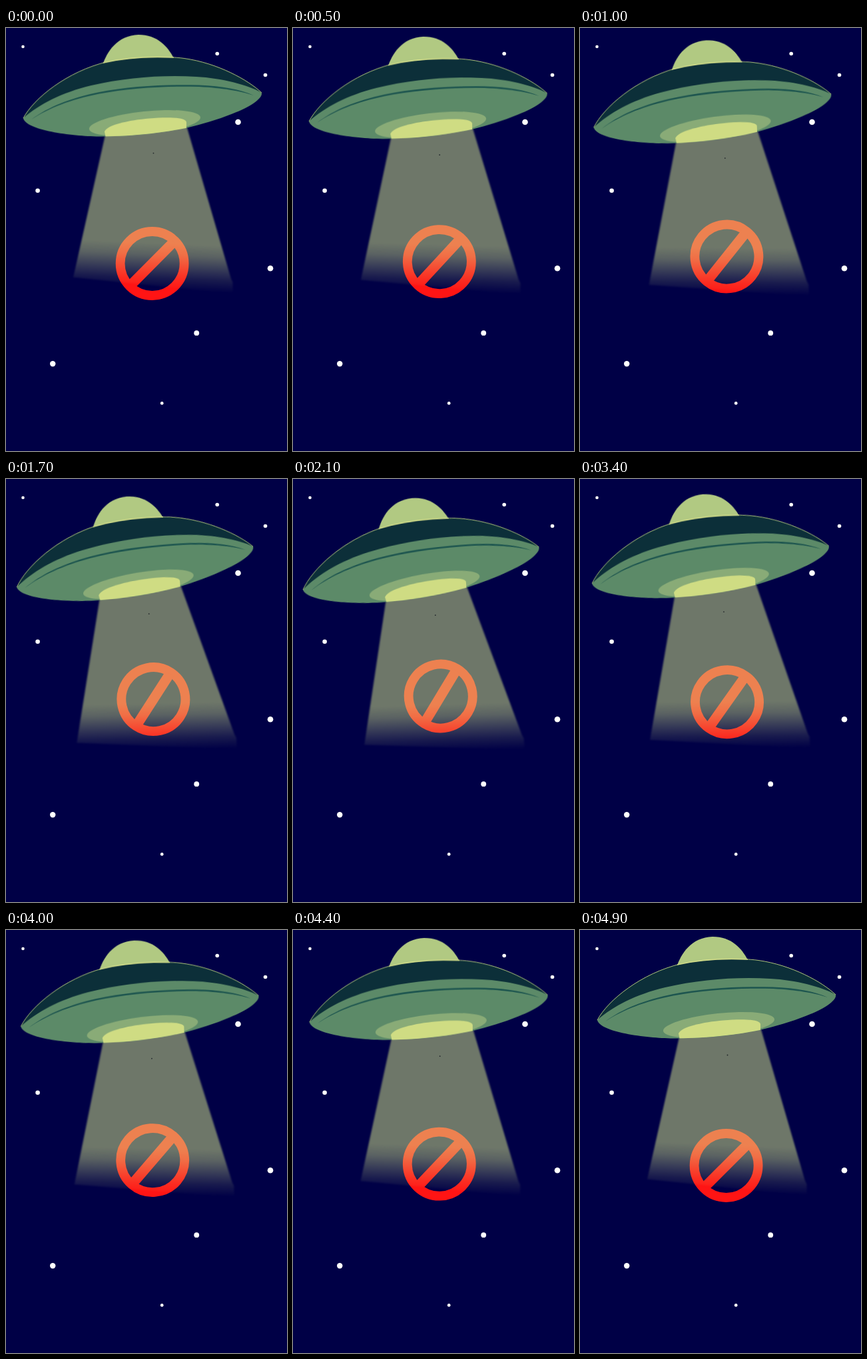
An HTML page for the animation above (5 s loop, 422 px wide and 634 px high).

```html
<!DOCTYPE html>
<html lang="en">
<head>
<meta charset="utf-8">
<title>Saucer</title>
<style>
  html, body { margin: 0; width: 100%; height: 100%; overflow: hidden; background: #000046; }
  svg { display: block; width: 100%; height: 100%; }
</style>
</head>
<body>
<svg viewBox="0 0 422 634" xmlns="http://www.w3.org/2000/svg">
  <defs>
    <linearGradient id="fade" gradientUnits="userSpaceOnUse" x1="220.5" y1="392" x2="223.500" y2="322">
      <stop offset="0" stop-color="#dcee8c" stop-opacity="0"/>
      <stop offset=".25" stop-color="#dcee8c" stop-opacity=".11"/>
      <stop offset=".5" stop-color="#dcee8c" stop-opacity=".26"/>
      <stop offset=".75" stop-color="#dcee8c" stop-opacity=".41"/>
      <stop offset="1" stop-color="#dcee8c" stop-opacity=".5"/>
    </linearGradient>
    <filter id="soft"><feGaussianBlur stdDeviation=".9"/></filter>
    <filter id="smooth"><feGaussianBlur stdDeviation=".4"/></filter>
    <clipPath id="hullClip">
      <path id="hull" d="M26 135 C42 105 92 65 152 50.500 C190 42.500 240 41.500 268 45.500 C318 52.500 364 78 384 97
        C386 105 368 118 340 128.500 C317 137.500 294 144.500 270 150 C228 158.500 185 162.500 140 162.500
        C98 162 30 153 26 135 Z"/>
    </clipPath>
  </defs>

  <rect width="422" height="634" fill="#000046"/>
  <g id="stars" fill="#fff"></g>

  <g id="sign" fill="none" stroke="#ff1414" stroke-width="13.800">
    <circle r="48"/>
    <path d="M-45 0H45" stroke-width="15"/>
  </g>

  <g id="ship">
    <path d="M150 156 L271 146 L338 376 L340.500 381 V398.500 L101 373.500 Z" fill="url(#fade)" filter="url(#soft)"/>
    <circle cx="221.500" cy="187.500" r=".9" fill="#23282c"/>

    <g filter="url(#smooth)">
      <path d="M145 56 C151 36 167 11 199 10 C228 10 243 28 252 45 L235 52 Z" fill="#b1c982"/>
      <use href="#hull" fill="#5c8a68"/>
      <g clip-path="url(#hullClip)">
        <ellipse cx="208.500" cy="142.500" rx="84" ry="17.500" transform="rotate(-6 208.500 142.500)" fill="#89ab77"/>
        <path d="M148 155 C152 145 185 138 215 135.500 C245 133 270 134 271 141 V153 L150 165 Z" fill="#cfdc83"/>
      </g>
      <path d="M26 135 C42 105 92 65 152 50.500 C190 42.500 240 41.500 268 45.500 C318 52.500 364 78 384 97
        C363 85 324 75 286 73 C236 70 180 74 128 86 C84 96.500 50 114 26 135 Z" fill="#0c2f39"/>
      <path d="M38 137 C64 118 96 105 140 96 C185 87 240 84 290 85.500 C326 87 352 92 372 101
        C350 94 326 90 290 88 C240 86.500 185 90 140 98.500 C96 107.500 66 119 38 137 Z" fill="#1d554f"/>
      <path d="M26 135 C42 105 92 65 152 50.500 C190 42.500 240 41.500 268 45.500 C318 52.500 364 78 384 97"
        fill="none" stroke="#a9bd78" stroke-width="1"/>
      <path d="M146 52 C180 44 220 42.500 252 44" fill="none" stroke="#cfdb88" stroke-width="1.600"/>
    </g>
  </g>
</svg>

<script>
  const LOOP = 5000, STEP = 100;
  const $ = id => document.getElementById(id);

  const stars = [
    [25.5, 28, 2.3], [317.2, 38.5, 2.8], [389.5, 70.5, 2.8],
    [348.5, 141, 4.3], [47.6, 243.7, 3.3], [397, 360.2, 4.3],
    [286.2, 457.2, 3.9], [70.2, 503.2, 4.2], [234.2, 562.4, 2.4]
  ];
  $("stars").innerHTML = stars
    .map(([x, y, r]) => `<circle cx="${x}" cy="${y}" r="${r}"/>`).join("");

  const ease = x => (1 - Math.cos(Math.PI * Math.min(1, Math.max(0, x)))) / 2;

  // The ship pauses briefly at the far end of its swing.
  const swing = t => ease(Math.min(t + 130, 4900 - t) / 2400);
  const lift = t => ease(Math.min(t, 4850 - t) / 2425);

  function draw(t) {
    const s = swing(t), l = lift(t);
    $("ship").setAttribute("transform", `rotate(${-4.23 * s} 445 301)`);
    $("sign").setAttribute("transform",
      `translate(${219.6 + 2.2 * l} ${353 - 28.8 * l}) rotate(${-45 - 14 * s})`);
  }

  const start = performance.now();
  function tick() {
    const t = (performance.now() - start) % LOOP;
    draw(Math.floor(t / STEP) * STEP);
    requestAnimationFrame(tick);
  }
  draw(0);
  requestAnimationFrame(tick);
</script>
</body>
</html>
```
